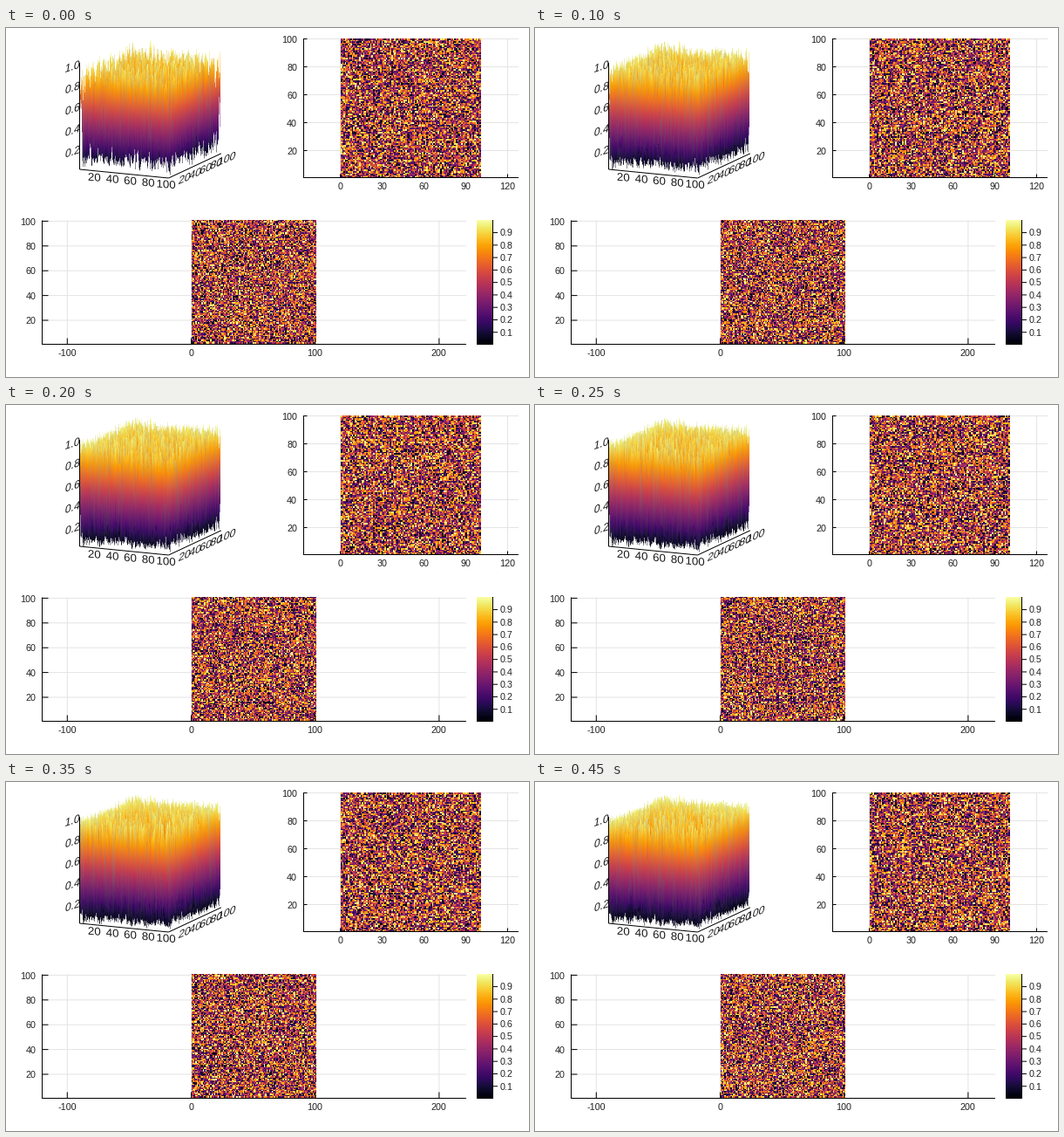
Write a matplotlib script that moves like this. It is 600 px wide and 400 px high and loops after 0.5 s.

```python
import matplotlib.pyplot as plt
import numpy as np
from matplotlib.animation import FuncAnimation
from matplotlib.patches import PathPatch
from matplotlib.textpath import TextPath
from matplotlib.transforms import Affine2D

W, H, DPI = 600, 400, 100
FRAMES, INTERVAL = 10, 50
N = 100
FONT = "Liberation Sans"
INFERNO = plt.get_cmap("inferno")

fig = plt.figure(figsize=(W / DPI, H / DPI), dpi=DPI, facecolor="white")
ax = fig.add_axes([0, 0, 1, 1])
ax.axis("off")


def line(x0, y0, x1, y1, color="black", width=1.0, z=5):
    ax.plot([x0, x1], [y0, y1], color=color, lw=width * 72 / DPI, zorder=z,
            solid_capstyle="butt", snap=False)


def label(x, y, text, align="center"):
    ax.text(x, y + 3.8, text, ha=align, va="baseline", family=FONT,
            fontsize=10.7 * 72 / DPI, color="#222222", zorder=6)


def picture(left, right, top, bottom, data, **kw):
    return ax.imshow(data, extent=(left, right, bottom, top), aspect="auto",
                     interpolation="nearest", zorder=3, **kw)


def heat_panel(left, right, top, bottom, box, xticks, yticks, tick, label_x):
    """Axes, grid and labels around a heatmap; ticks are (value, pixel)."""
    for value, x in xticks:
        line(x, top, x, bottom, "#e4e4e4", z=1)
        line(x, bottom, x, bottom - tick)
        label(x - 0.3, bottom + 9.5, str(value))
    for value, y in yticks:
        line(left, y, right, y, "#e4e4e4", z=1)
        line(left, y, left + tick, y)
        label(label_x, y + 0.3, str(value), "right")
    line(left, top, left, bottom + 0.5)
    line(left - 0.5, bottom, right, bottom)
    return picture(*box, np.zeros((N, N)), cmap=INFERNO, vmin=0, vmax=1)


upper = heat_panel(
    341.5, 588, 12, 171.5, (384, 545, 12, 172),
    [(v, 383.5 + 1.6 * v) for v in range(0, 121, 30)],
    [(v, 172.5 - 1.6 * v) for v in range(20, 101, 20)], 4, 334)
lower = heat_panel(
    41.5, 528, 220.5, 362.5, (213, 356, 220, 363),
    [(v, 212.5 + 1.422 * v) for v in range(-100, 201, 100)],
    [(v, 363.4 - 1.42 * v) for v in range(20, 101, 20)], 7, 34.5)

# Colour bar
picture(540, 558, 220, 363, np.linspace(1, 0, 256)[:, None], cmap=INFERNO)
line(558.5, 220, 558.5, 363)
for k in range(1, 10):
    y = 363 - 14.27 * k
    line(558, y, 564, y)
    label(566.2, y, f"{k / 10:.1f}", "left")

# Projection of the unit cube to pixels
ORIGIN = np.array([84.5, 162.0])
X_AXIS = np.array([102.0, 10.0])
Y_AXIS = np.array([60.0, -28.0])
Z_SIZE = 122.0


def skewed(text, center, along, up, size=13.3):
    """Text lying in a plane of the cube, centred on a pixel."""
    path = TextPath((0, 0), text, size=size, prop={"family": FONT})
    box = path.get_extents()
    move = Affine2D().translate(-(box.x0 + box.x1) / 2, -(box.y0 + box.y1) / 2)
    tilt = Affine2D.from_values(along[0], along[1], up[0], up[1], *center)
    ax.add_patch(PathPatch((move + tilt).transform_path(path),
                           fc="#1a1a1a", lw=0, zorder=6))


def cube_axes():
    corner = ORIGIN + X_AXIS
    line(*ORIGIN, *corner)
    line(*corner, *(corner + Y_AXIS))
    line(*ORIGIN, ORIGIN[0], ORIGIN[1] - Z_SIZE)
    for v in range(20, 101, 20):
        t = (v - 1) / (N - 1)
        px = ORIGIN + t * X_AXIS
        py = corner + t * Y_AXIS
        pz = ORIGIN - [0, Z_SIZE * v / 100]
        line(*px, *(px + 0.05 * Y_AXIS), z=2)
        line(*py, *(py - 0.03 * X_AXIS), z=2)
        line(*pz, *(pz + 0.04 * X_AXIS), z=2)
        skewed(str(v), px + [-2.7, 7], (1, 0.08), (0, -0.95))
        skewed(str(v), py + [7, 5.5], (0.92, -0.38), (0.2, -0.98))
        skewed(f"{v / 100:.1f}", pz + [-8, 3.8], (0.92, -0.3), (0.15, -1))


cube_axes()

# Sight lines through the surface, one per subpixel column, front to back
SS, STEPS = 2, 320
LEFT, RIGHT, TOP, BOTTOM = 84, 246, 8, 174
cols = np.arange(LEFT, RIGHT, 1 / SS) + 0.5 / SS
rows = np.arange(TOP, BOTTOM, 1 / SS) + 0.5 / SS
reach = np.clip(cols - ORIGIN[0], 0, X_AXIS[0] + Y_AXIS[0])[:, None]
near = np.maximum(0, (reach - X_AXIS[0]) / Y_AXIS[0])
far = np.minimum(1, reach / Y_AXIS[0])
V = near + (far - near) * np.linspace(0, 1, STEPS)
U = np.clip((reach - Y_AXIS[0] * V) / X_AXIS[0], 0, 1)
GROUND = ORIGIN[1] + X_AXIS[1] * U + Y_AXIS[1] * V
iu = np.minimum((U * (N - 1)).astype(int), N - 2)
iv = np.minimum((V * (N - 1)).astype(int), N - 2)
fu, fv = U * (N - 1) - iu, V * (N - 1) - iv


def paint(canvas, z):
    """Paint the surface z over the canvas, coloured by height and light."""
    a, b = z[iv, iu], z[iv, iu + 1]
    c, d = z[iv + 1, iu], z[iv + 1, iu + 1]
    front, back = a + (b - a) * fu, c + (d - c) * fu
    height = front + (back - front) * fv
    slope_u = (b - a) * (1 - fv) + (d - c) * fv
    slope_v = back - front
    # Facets seen edge-on turn greyish
    glance = 1 - np.abs(slope_v) / (np.hypot(slope_u, slope_v) + 1e-6)

    under = (GROUND - Z_SIZE * height)[:, :, None] > rows
    cross = under[:, 1:] != under[:, :-1]
    first = cross.argmax(axis=1)
    met = cross.any(axis=1)
    level = (np.take_along_axis(GROUND, first, axis=1) - rows) / Z_SIZE
    level = np.clip(level, 0, 1)
    rgb = INFERNO(level)[..., :3]
    grey = 0.4 * np.take_along_axis(glance, first, axis=1)[..., None]
    rgb += (0.15 + 0.6 * level[..., None] - rgb) * grey
    canvas[met] = rgb[met]


def shrink(canvas):
    h, w = len(rows) // SS, len(cols) // SS
    rgb = canvas.transpose(1, 0, 2)
    return rgb.reshape(h, SS, w, SS, 3).mean(axis=(1, 3))


def build_solids():
    """Each step adds one more random surface on top of the earlier ones."""
    rng = np.random.default_rng(40)
    canvas = np.ones((len(cols), len(rows), 3))
    shots = []
    for _ in range(FRAMES):
        paint(canvas, rng.random((N, N)))
        shots.append(shrink(canvas))
    return shots


solids = build_solids()
solid = picture(LEFT, RIGHT, TOP, BOTTOM, solids[0])
ax.set_xlim(0, W)
ax.set_ylim(H, 0)


def update(frame):
    rng = np.random.default_rng(70 + frame)
    solid.set_data(solids[frame])
    upper.set_data(rng.random((N, N)))
    lower.set_data(rng.random((N, N)))
    return solid, upper, lower


anim = FuncAnimation(fig, update, frames=FRAMES, interval=INTERVAL,
                     repeat=True, repeat_delay=0, blit=False)
plt.show()
```
